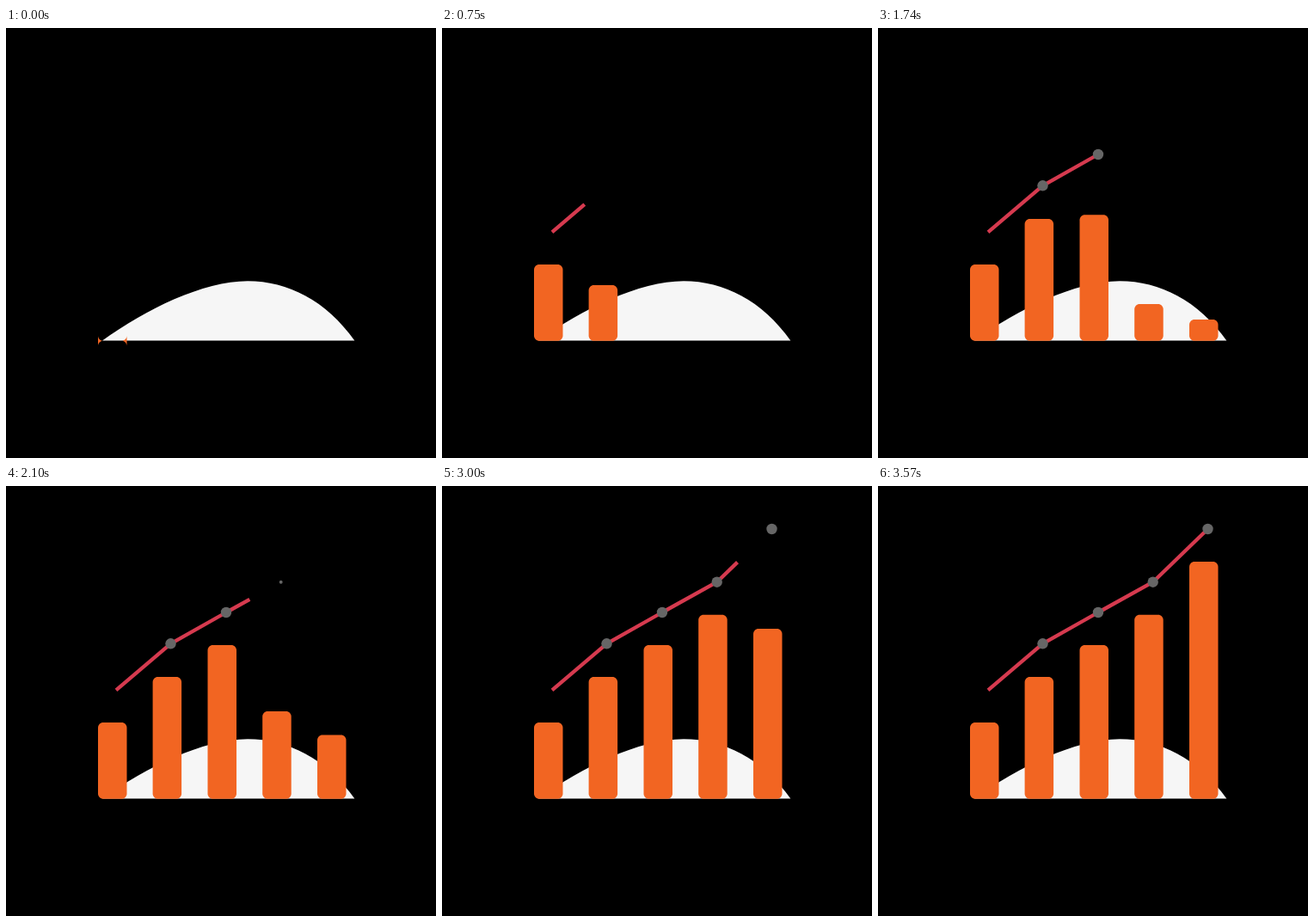
Recreate the animation shown at these times as an HTML page with a canvas. Size 500x500 px, loop 3630 ms.

```html
<!DOCTYPE html>
<html lang="en">
<head>
<meta charset="utf-8">
<title>Growing bar chart</title>
<style>
  html, body { margin: 0; height: 100%; overflow: hidden; background: #000; }
  canvas { display: block; }
</style>
</head>
<body>
<canvas id="stage" width="500" height="500"></canvas>
<script>
const ctx = document.getElementById('stage').getContext('2d');
const LOOP = 3630, STEP = 30, LAST = 3570;
const BASE = 363.8, BAR_WIDTH = 33.5, RADIUS = 6;

// Times are in ms from the start of the loop.
const bars = [
  { x: 107, top: 275, start: 0, end: 500 },
  { x: 170.6, top: 222, start: 430, end: 1130 },
  { x: 234.5, top: 185, start: 907, end: 1923 },
  { x: 298.2, top: 149.7, start: 1478, end: 2787 },
  { x: 362, top: 88, start: 1559, end: 3568 }
];
const points = [[128, 237.3], [191.5, 183.3], [256, 147], [319.7, 111.7], [383.5, 50]];
const segments = [[280, 1070], [1080, 1640], [1740, 2580], [2660, 3570]];
const dotStarts = [900, 1450, 2050, 2740];
const DOT_TIME = 160;

const progress = (t, start, end) => Math.min(1, Math.max(0, (t - start) / (end - start)));

function drawHill() {
  ctx.fillStyle = '#f6f6f6';
  ctx.beginPath();
  ctx.moveTo(112, 363.5);
  ctx.bezierCurveTo(162, 327.5, 229, 294.3, 281, 294.3);
  ctx.bezierCurveTo(328, 294.3, 372, 317, 405.3, 363.5);
  ctx.fill();
}

// The corners keep their size, so a flat bar crosses over itself.
function drawBar({ x, top, start, end }, t) {
  if (t < start) return;
  const y = BASE + (top - BASE) * progress(t, start, end);
  const right = x + BAR_WIDTH, r = RADIUS, k = r * 0.45;
  ctx.beginPath();
  ctx.moveTo(x, y + r);
  ctx.bezierCurveTo(x, y + k, x + k, y, x + r, y);
  ctx.lineTo(right - r, y);
  ctx.bezierCurveTo(right - k, y, right, y + k, right, y + r);
  ctx.lineTo(right, BASE - r);
  ctx.bezierCurveTo(right, BASE - k, right - k, BASE, right - r, BASE);
  ctx.lineTo(x + r, BASE);
  ctx.bezierCurveTo(x + k, BASE, x, BASE - k, x, BASE - r);
  ctx.fill();
}

function drawSegment([start, end], i, t) {
  const p = progress(t, start, end);
  if (!p) return;
  const [x1, y1] = points[i], [x2, y2] = points[i + 1];
  ctx.beginPath();
  ctx.moveTo(x1, y1);
  ctx.lineTo(x1 + (x2 - x1) * p, y1 + (y2 - y1) * p);
  ctx.stroke();
}

function drawDot(start, i, t) {
  const [x, y] = points[i + 1];
  ctx.beginPath();
  ctx.arc(x, y, 6.2 * progress(t, start, start + DOT_TIME), 0, Math.PI * 2);
  ctx.fill();
}

function draw(t) {
  ctx.fillStyle = '#000';
  ctx.fillRect(0, 0, 500, 500);
  drawHill();
  ctx.fillStyle = '#f26522';
  bars.forEach(bar => drawBar(bar, t));
  ctx.strokeStyle = '#d63a4f';
  ctx.lineWidth = 4.3;
  segments.forEach((segment, i) => drawSegment(segment, i, t));
  ctx.fillStyle = '#666';
  dotStarts.forEach((start, i) => drawDot(start, i, t));
}

function tick() {
  const t = performance.now() % LOOP;
  draw(Math.min(LAST, Math.floor(t / STEP) * STEP));
  requestAnimationFrame(tick);
}
tick();
</script>
</body>
</html>
```
